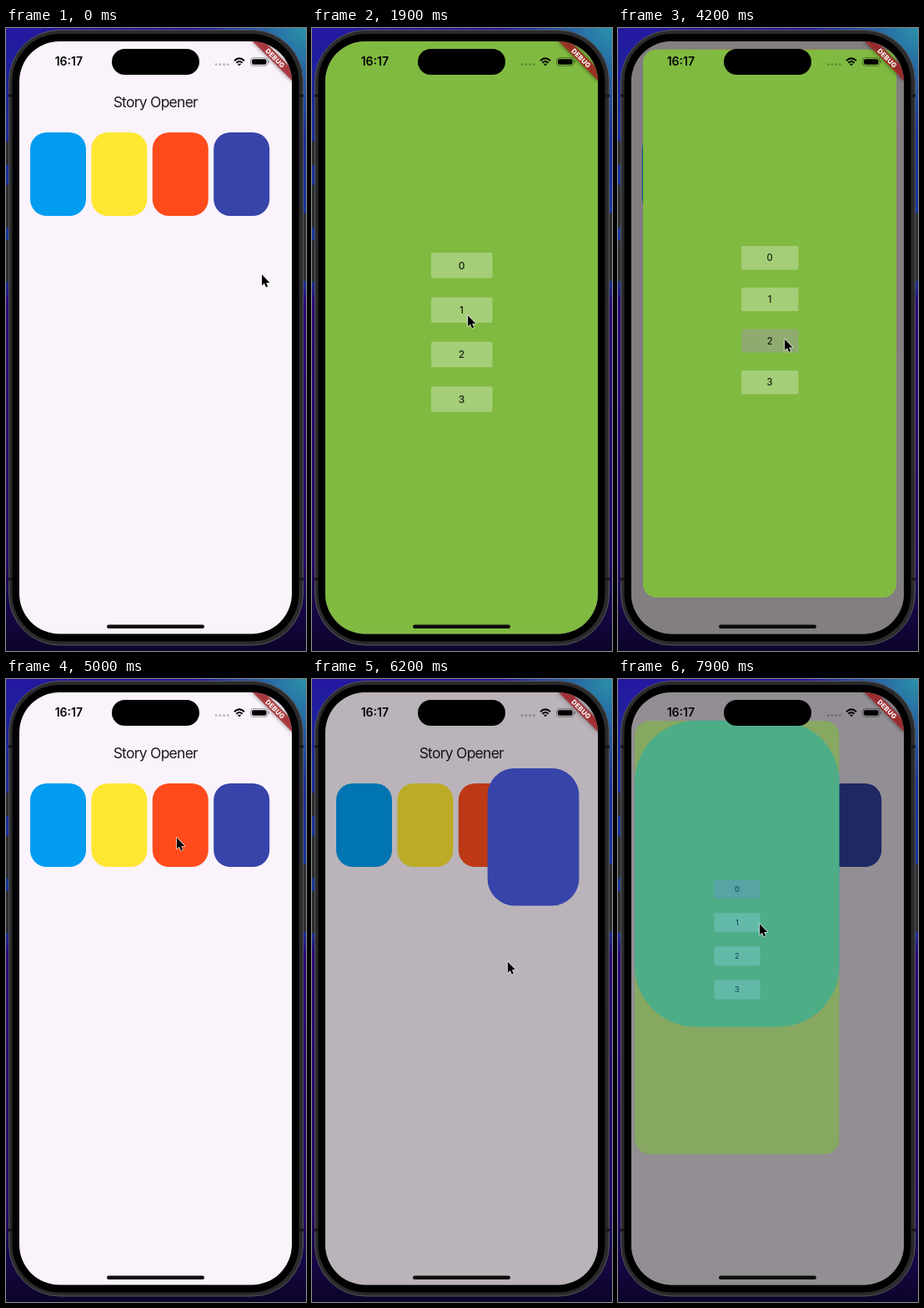
These frames come from a looping animation (360x746 px, 8000 ms). An HTML page:

```html
<!DOCTYPE html>
<html lang="en">
<head>
<meta charset="utf-8">
<title>Story Opener</title>
<style>
  html, body { margin: 0; width: 100%; height: 100%; overflow: hidden; background: #120540; }
  svg { display: block; width: 360px; height: 746px; font-family: Inter, sans-serif; }
  text { text-anchor: middle; }
</style>
</head>
<body>
<svg viewBox="0 0 360 746">
  <defs>
    <linearGradient id="wall" x2="0" y2="1">
      <stop offset="0" stop-color="#2417a0"/>
      <stop offset=".12" stop-color="#1b2a9c"/>
      <stop offset=".4" stop-color="#173c9c"/>
      <stop offset=".44" stop-color="#2a0878"/>
      <stop offset=".85" stop-color="#24086c"/>
      <stop offset="1" stop-color="#0c0428"/>
    </linearGradient>
    <radialGradient id="glow" cx="360" cy="0" r="130" gradientUnits="userSpaceOnUse">
      <stop offset="0" stop-color="#2a93a8"/>
      <stop offset="1" stop-color="#2a93a8" stop-opacity="0"/>
    </radialGradient>
    <clipPath id="screen"><rect x="16" y="16" width="327" height="709.5" rx="48"/></clipPath>
    <clipPath id="frame"><rect id="frameRect"/></clipPath>
  </defs>

  <rect width="360" height="746" fill="url(#wall)"/>
  <rect width="360" height="746" fill="url(#glow)"/>

  <!-- phone body -->
  <path d="M1.5 136V164M1.5 188V239M1.5 254V304M358.5 222V303" stroke="#2b2c30" stroke-width="3"/>
  <rect x="3.5" y="2.5" width="353" height="736.5" rx="61" fill="#2b2b2d" stroke="#55565a"/>
  <path d="M3 81H8M352 81H357M3 660H8M352 660H357" stroke="#171719" stroke-width="3"/>
  <rect x="7.5" y="7" width="344" height="727.5" rx="57"/>

  <g clip-path="url(#screen)">
    <rect x="16" y="16" width="327" height="710" fill="#faf3fb"/>
    <text x="179.3" y="95" font-size="17.5" letter-spacing="-.75" fill="#1d1b20">Story Opener</text>
    <g id="cards"></g>
    <rect id="scrim" x="16" y="16" width="327" height="710"/>
    <g id="story" clip-path="url(#frame)">
      <rect id="cover" width="67" height="100" rx="20"/>
      <g id="page">
        <rect width="327" height="720" fill="#80ba40"/>
        <g id="buttons" font-size="12" font-weight="500" fill="#18210f"></g>
      </g>
    </g>

    <!-- status bar -->
    <text x="75.3" y="45.3" font-size="14" font-weight="600">16:17</text>
    <rect x="127" y="25" width="105" height="31" rx="15.5"/>
    <path d="M252.2 43.7H267" stroke="#000" stroke-opacity=".27" stroke-width="2.8" stroke-linecap="round" stroke-dasharray="0 4.7"/>
    <g fill="none" stroke="#000" stroke-width="2">
      <path d="M274 39.2Q280 33.6 286 39.2M276.4 41.7Q280 38.4 283.6 41.7"/>
      <path d="M278.4 43.2H281.6L280 45Z" stroke-width="1"/>
      <rect x="293.5" y="35.7" width="20.5" height="9.6" rx="3.2" stroke-width="1" stroke-opacity=".4"/>
    </g>
    <rect x="295" y="37.2" width="17.5" height="6.6" rx="2"/>
    <path d="M315.3 39V42.2" stroke="#000" stroke-opacity=".4"/>

    <!-- corner banner -->
    <g transform="translate(343 16) rotate(45)">
      <rect x="-34" y="23.3" width="68" height="10" opacity=".5" style="filter:blur(2.4px)"/>
      <rect x="-34" y="23.3" width="68" height="10" fill="#b02024" fill-opacity=".75"/>
      <text y="31.3" font-size="8" font-weight="800" fill="#fff" letter-spacing=".2">DEBUG</text>
    </g>
    <rect x="121" y="714.5" width="117" height="4.4" rx="2.2" fill="#0c0c0c"/>
  </g>

  <path id="cursor" d="M0 0V13.6L3 10.8L5 15.4L7.2 14.4L5.2 9.9H9.4Z" stroke="#fff" stroke-width="1.2" stroke-linejoin="round" paint-order="stroke"/>
</svg>

<script>
const LOOP = 8000, DURATION = 500, SCRIM = 0.58;
const FULL = [16, 16, 327, 709.5];
const COLORS = ['#029cf0', '#fde733', '#ff4b1c', '#3744a9'];

// [start, card, opening?]
const EVENTS = [
  [950, 0, 1], [2630, 1, 0], [3250, 1, 1], [4117, 2, 0],
  [5020, 2, 1], [5925, 3, 0], [6805, 3, 1], [7761, 0, 0]
];

// pointer stops: [time, x, y]
const STOPS = [
  [0, 307, 295], [850, 62, 190], [1050, 62, 190], [1900, 187, 344], [2620, 187, 344],
  [3080, 153, 194], [3270, 153, 194], [3900, 200, 377], [4140, 200, 377],
  [4800, 205, 190], [5020, 205, 190], [5700, 200, 442], [5920, 200, 442],
  [6550, 283, 195], [6800, 283, 195], [7000, 252, 260], [7550, 170, 293], [LOOP, 170, 293]
];

const $ = id => document.getElementById(id);
const clamp = v => Math.max(0, Math.min(1, v));
const lerp = (a, b, k) => a + (b - a) * k;
const set = (el, attrs) => { for (const k in attrs) el.setAttribute(k, attrs[k]); };
const cardRect = i => [29 + 73.4 * i, 125, 67, 100];

$('cards').innerHTML = COLORS.map((c, i) =>
  `<rect x="${cardRect(i)[0]}" y="125" width="67" height="100" rx="20" fill="${c}"/>`).join('');

$('buttons').innerHTML = COLORS.map((c, i) => {
  const y = 253 + 53.4 * i;
  const box = `x="127" y="${y}" width="73.5" height="30.5" rx="2"`;
  return `<rect ${box} fill="#fff" fill-opacity=".29"/>
    <rect class="press" ${box} fill="#3c1e50"/>
    <text x="163.5" y="${y + 19.6}">${i}</text>`;
}).join('');

const cards = [...$('cards').children];
const presses = [...document.querySelectorAll('.press')];

// cubic-bezier(.4, 0, .2, 1)
function ease(x) {
  let lo = 0, hi = 1;
  for (let i = 0; i < 20; i++) {
    const s = (lo + hi) / 2, r = 1 - s;
    if (1.2 * r * r * s + 0.6 * r * s * s + s ** 3 < x) lo = s; else hi = s;
  }
  return lo * lo * (3 - 2 * lo);
}

// Hermite path that comes to rest wherever the pointer waits
function pointerAt(t) {
  const i = Math.max(0, STOPS.findIndex(s => s[0] > t) - 1);
  const a = STOPS[i], b = STOPS[i + 1], span = b[0] - a[0], k = (t - a[0]) / span;
  const slope = (n, axis) => {
    const p = STOPS[n - 1], c = STOPS[n], q = STOPS[n + 1];
    const waits = !p || !q || [p, q].some(s => s[1] === c[1] && s[2] === c[2]);
    return waits ? 0 : (q[axis] - p[axis]) / (q[0] - p[0]) * span;
  };
  return [1, 2].map(axis => lerp(a[axis], b[axis], k * k * (3 - 2 * k))
    + k * (1 - k) ** 2 * slope(i, axis) - k * k * (1 - k) * slope(i + 1, axis));
}

function drawStory(t) {
  const [start, card, opening] = EVENTS.filter(e => e[0] <= t).pop() || [-DURATION, 0, 0];
  const elapsed = clamp((t - start) / DURATION);
  const value = opening ? elapsed : 1 - elapsed;
  const shrink = opening ? 1 - ease(elapsed) : ease(elapsed);
  const visible = value > 0;

  set($('scrim'), { opacity: SCRIM * (opening ? clamp(value * 5) : value) });
  set($('story'), { visibility: visible ? 'visible' : 'hidden' });
  cards.forEach((c, i) => set(c, { visibility: visible && i === card ? 'hidden' : 'visible' }));

  const target = cardRect(card);
  const [x, y, width, height] = FULL.map((v, i) => lerp(v, target[i], shrink));
  const place = w => `translate(${x} ${y}) scale(${width / w})`;
  set($('frameRect'), { x, y, width, height, rx: 16 + 6 * shrink });
  set($('cover'), { transform: place(67), fill: COLORS[card] });
  set($('page'), { transform: place(327), opacity: clamp((value - (opening ? 0.2 : 0.6)) * 5) });

  const next = EVENTS.find(e => !e[2] && t < e[0] + DURATION);
  presses.forEach((p, i) => set(p, {
    opacity: next && next[1] === i ? 0.2 * clamp((t - next[0] + 60) / 80) : 0
  }));
}

function draw(now) {
  const t = now % LOOP;
  drawStory(t);
  set($('cursor'), { transform: `translate(${pointerAt(t)})` });
  requestAnimationFrame(draw);
}
draw(0);
</script>
</body>
</html>
```
